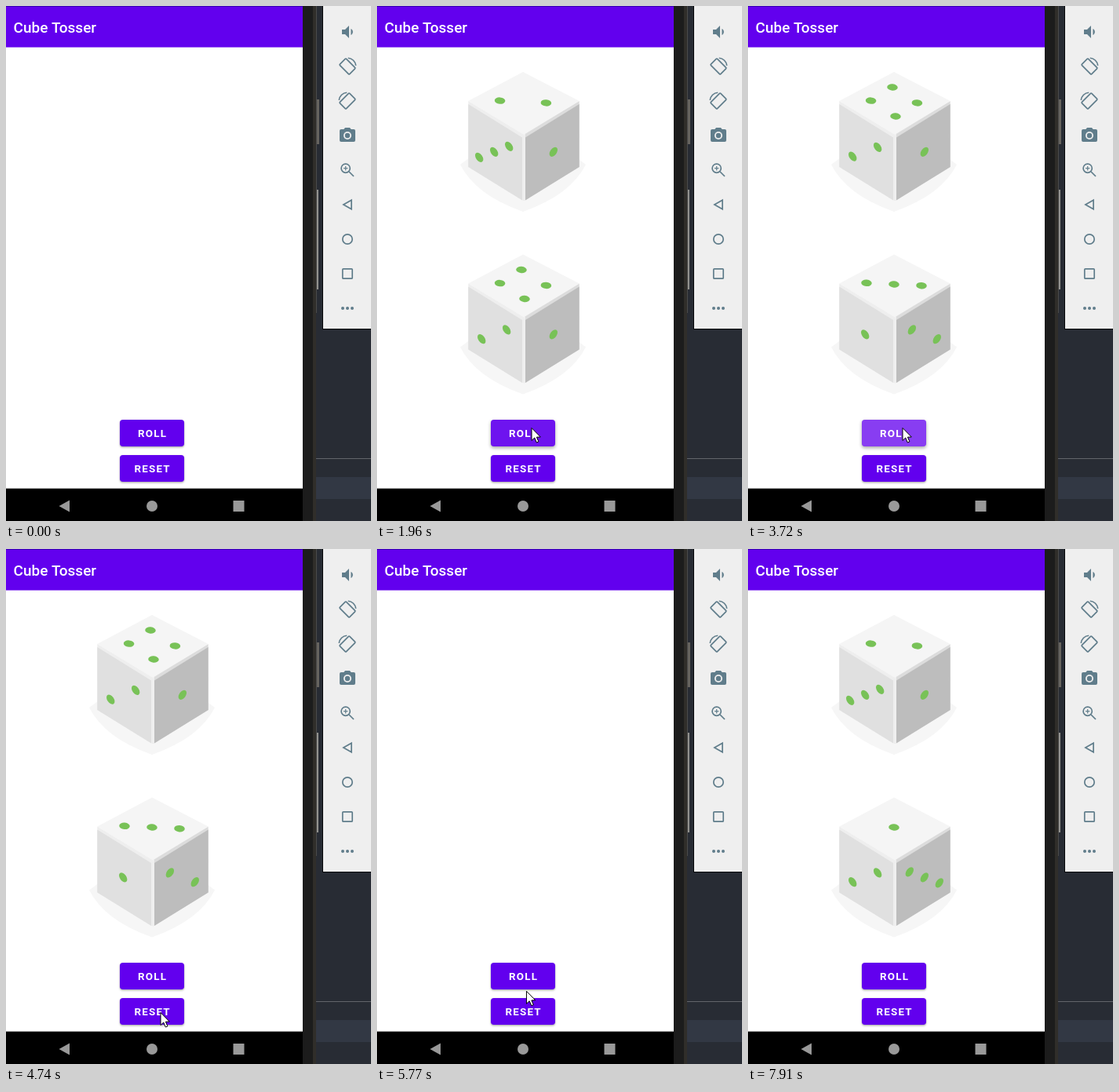
Write an HTML page with a canvas that moves like this. It is 465 by 656 pixels and loops after 8.24 s.

```html
<!DOCTYPE html>
<html lang="en">
<head>
<meta charset="utf-8">
<title>Cube Tosser</title>
<style>
  html, body { margin: 0; width: 100%; height: 100%; overflow: hidden; background: #282c34; }
  canvas { display: block; width: 465px; height: 656px; }
</style>
</head>
<body>
<canvas id="stage"></canvas>
<script>
const W = 465, H = 656, LOOP = 8240, TICK = 70;
const RESULT_DELAY = 140, FADE = 210;
const PURPLE = '#6200ee', ICON = '#607d8b', PANEL = '#efefef', GREY = '#999';

const canvas = document.getElementById('stage');
const ctx = canvas.getContext('2d');
const ratio = window.devicePixelRatio || 1;
canvas.width = W * ratio;
canvas.height = H * ratio;

const roll = { label: 'ROLL', y: 527 };
const reset = { label: 'RESET', y: 572 };

// hold: time from the press until the ripple starts to fade
const clicks = [
  { at: 1610, button: roll, hold: 210, dice: [2, 4] },
  { at: 2620, button: roll, hold: 210, dice: [3, 2] },
  { at: 3440, button: roll, hold: 280, dice: [4, 3] },
  { at: 5140, button: reset, hold: 280, dice: [] },
  { at: 6320, button: roll, hold: 280, dice: [2, 1] }
];

const easeIn = u => u ** 1.4;
const easeOut = u => 1 - (1 - u) ** 1.6;
const smooth = u => u * u * (3 - 2 * u);

// bend lifts the middle of a path
const moves = [
  { start: 180, end: 1020, x: 407, y: 612, ease: easeOut },
  { start: 4320, end: 4740, x: 196.5, y: 537, ease: smooth },
  { start: 5490, end: 5980, x: 196.5, y: 590, ease: smooth },
  { start: 7070, end: 7840, x: 185.7, y: 545, ease: easeIn, bend: 170 },
  { start: 7910, x: 411, y: 646 }
];

function rect(x, y, w, h, color) {
  ctx.fillStyle = color;
  ctx.fillRect(x, y, w, h);
}

function trace(points) {
  ctx.beginPath();
  points.forEach(([x, y]) => ctx.lineTo(x, y));
}

function poly(points, color) {
  trace(points);
  ctx.closePath();
  ctx.fillStyle = color;
  ctx.fill();
}

function line(...points) {
  trace(points);
  ctx.stroke();
}

function disc(x, y, r, color) {
  ctx.beginPath();
  ctx.arc(x, y, r, 0, Math.PI * 2);
  ctx.fillStyle = color;
  ctx.fill();
}

function ring(x, y, r, from = 0, to = Math.PI * 2) {
  ctx.beginPath();
  ctx.arc(x, y, r, from, to);
  ctx.stroke();
}

function roundRect(x, y, w, h, r) {
  ctx.beginPath();
  ctx.roundRect(x, y, w, h, r);
}

function box(w, h) {
  roundRect(-w / 2, -h / 2, w, h, 1);
  ctx.stroke();
}

function at(x, y, draw) {
  ctx.save();
  ctx.translate(x, y);
  draw();
  ctx.restore();
}

function text(label, x, y, weight, size, spacing, align) {
  ctx.font = `${weight} ${size}px Roboto, sans-serif`;
  ctx.letterSpacing = spacing + 'px';
  ctx.textAlign = align;
  ctx.fillStyle = '#fff';
  ctx.fillText(label, x, y);
}

function volumeIcon() {
  ctx.fillRect(-7, -3, 5, 6);
  poly([[-3, -3], [2, -8], [2, 8], [-3, 3]], ICON);
  ctx.beginPath();
  ctx.arc(2.4, 0, 4.5, -1.1, 1.1);
  ctx.fill();
}

function rotateIcon(side) {
  ctx.scale(side, 1);
  ring(0, 0, 10.8, -1.5, -0.1);
  ctx.rotate(-Math.PI / 4);
  box(11.5, 17.5);
}

function cameraIcon() {
  roundRect(-10, -8, 20, 16, 2);
  ctx.fill();
  poly([[-5.5, -7], [-3, -10], [3, -10], [5.5, -7]], ICON);
  disc(0, 0, 5, PANEL);
  disc(0, 0, 3.2, ICON);
}

function zoomIcon() {
  ring(-2.3, -2.3, 5.6);
  line([2, 2], [8, 8]);
  ctx.lineWidth = 1.2;
  line([-5, -2.3], [0.4, -2.3]);
  line([-2.3, -5], [-2.3, 0.4]);
}

const icons = [
  volumeIcon,
  () => rotateIcon(1),
  () => rotateIcon(-1),
  cameraIcon,
  zoomIcon,
  () => { trace([[-5.1, 0], [5.1, -5.8], [5.1, 5.8]]); ctx.closePath(); ctx.stroke(); },
  () => ring(0, 0, 6.2),
  () => box(12.4, 12.4),
  () => [-6, 0, 6].forEach(x => disc(x, 0, 2, ICON))
];

function drawSurroundings() {
  rect(378, 0, W - 378, H, '#282c34');
  rect(395, 576, 70, 1, '#62656a');
  rect(395, 600, 70, 28, '#323844');

  rect(378, 0, 13, H, '#1c1c1c');
  rect(391, 0, 4, H, '#302e2a');
  rect(395, 0, 1, 391, '#4a4a4a');
  rect(396, 119, 3, 57, '#66645f');
  rect(396, 234, 2, 127, '#92928f');

  rect(403, 0, 62, 412, '#08090b');
  rect(404, 0, 61, 411, PANEL);
  icons.forEach((draw, i) => at(435, 33 + i * 44, () => {
    ctx.fillStyle = ctx.strokeStyle = ICON;
    ctx.lineWidth = 1.7;
    draw();
  }));
}

function drawScreen() {
  rect(0, 0, 378, H, '#fff');
  rect(0, 0, 378, 52.6, PURPLE);
  rect(0, 0, 378, 1, '#3700b3');
  text('Cube Tosser', 9.5, 34, 500, 19, 0, 'left');

  rect(0, 614.6, 378, 42, '#000');
  poly([[67.5, 637], [81, 629.5], [81, 644.5]], GREY);
  disc(186, 637, 7, GREY);
  rect(289.5, 630, 14, 14, GREY);
}

// Pips sit on one line through the centre; a fourth adds a crossing pair.
function drawPips(count, x, y, [dx, dy], angle) {
  const row = count === 4 ? 2 : count;
  const reach = row === 2 ? 0.84 : 1;
  const spots = Array.from({ length: row }, (_, i) => {
    const k = row > 1 ? (2 * i / (row - 1) - 1) * reach : 0;
    return [x + k * dx, y + k * dy];
  });
  if (count === 4) spots.push([x - 2, y - 18.5], [x + 2, y + 18.5]);
  for (const [px, py] of spots) {
    ctx.beginPath();
    ctx.ellipse(px, py, 6.8, 4.2, angle, 0, Math.PI * 2);
    ctx.fillStyle = '#78c257';
    ctx.fill();
  }
}

// Drawn around the front corner of the top; both sides share one mirrored shape.
function drawDie(value) {
  const left = value % 3 + 1;
  const right = Math.max(1, 6 - value - left);
  const sides = [
    { mirror: -1, count: left, face: '#e0e0e0', bevel: '#eeeeee' },
    { mirror: 1, count: right, face: '#bdbdbd', bevel: '#dcdcdc' }
  ];

  ctx.beginPath();
  ctx.moveTo(-81, 39);
  ctx.quadraticCurveTo(-61, 78, -1, 99);
  ctx.quadraticCurveTo(59, 78, 79, 39);
  ctx.lineTo(0, -20);
  ctx.fillStyle = '#f6f6f6';
  ctx.fill();

  for (const { mirror, count, face, bevel } of sides) {
    ctx.save();
    ctx.scale(mirror, 1);
    poly([[0, 0], [70.7, -42], [70.7, 42], [0, 85]], bevel);
    poly([[2, 4.5], [70.7, -38], [70.7, 42], [2, 84.5]], face);
    drawPips(count, 37.8, 22.8, [19, 7], -0.96);
    ctx.restore();
  }
  rect(-2, 0, 4, 84.5, '#eeeeee');
  poly([[-1, -79], [70.7, -42], [0, 1], [-70.7, -42]], '#f5f5f5');
  drawPips(value, -1, -41, [35, 1.7], 0.08);
}

function drawButton({ label, y }, press, pointer) {
  const pressed = press && press.age >= TICK;
  ctx.save();
  ctx.shadowColor = 'rgba(0,0,0,0.35)';
  ctx.shadowBlur = (pressed ? 4.5 : 2.5) * ratio;
  ctx.shadowOffsetY = (pressed ? 2 : 1.2) * ratio;
  roundRect(145, y, 82, 34, 4);
  ctx.fillStyle = PURPLE;
  ctx.fill();
  ctx.restore();

  if (pressed) {
    const fade = Math.min(1, 1 - (press.age - press.hold) / FADE);
    ctx.save();
    roundRect(145, y, 82, 34, 4);
    ctx.clip();
    disc(pointer.x, pointer.y, press.age * 0.42, `rgba(255,255,255,${0.24 * fade})`);
    ctx.restore();
  }
  text(label, 186.6, y + 22.4, 600, 13.4, 1.2, 'center');
}

// Time since start, in whole ticks like a screen recording.
const ticked = (t, start) => Math.floor((t - start) / TICK) * TICK;

function pointerAt(t) {
  const i = moves.findLastIndex(move => t >= move.start);
  if (i < 0 || i === moves.length - 1) return null;
  const from = moves[i], to = moves[i + 1];
  const u = from.ease(Math.min(1, ticked(t, from.start) / (from.end - from.start)));
  return {
    x: from.x + (to.x - from.x) * u,
    y: from.y + (to.y - from.y) * u - (from.bend || 0) * u * (1 - u)
  };
}

function drawPointer() {
  trace([[0.5, 0.5], [0.5, 16.5], [4.2, 13], [6.8, 19], [9.4, 17.9], [6.9, 12.2], [11.8, 12]]);
  ctx.closePath();
  ctx.fillStyle = '#fff';
  ctx.fill();
  ctx.strokeStyle = '#000';
  ctx.lineWidth = 1;
  ctx.stroke();
}

function render(t) {
  ctx.setTransform(ratio, 0, 0, ratio, 0, 0);
  const pointer = pointerAt(t);
  let dice = [], press = null;
  for (const click of clicks) {
    const age = ticked(t, click.at);
    if (age >= RESULT_DELAY) dice = click.dice;
    if (age >= 0 && age < click.hold + FADE) press = { ...click, age };
  }

  drawSurroundings();
  drawScreen();
  dice.forEach((value, i) => at(187, 163 + i * 232.5, () => drawDie(value)));
  for (const button of [roll, reset]) {
    drawButton(button, press && press.button === button ? press : null, pointer);
  }
  if (pointer) {
    at(pointer.x, pointer.y, drawPointer);
    if (press && press.age < RESULT_DELAY) {
      disc(pointer.x - 0.5, pointer.y, 12, 'rgba(255,255,0,0.45)');
    }
  }
}

const begin = performance.now();
function frame() {
  render((performance.now() - begin) % LOOP);
  requestAnimationFrame(frame);
}
frame();
</script>
</body>
</html>
```
